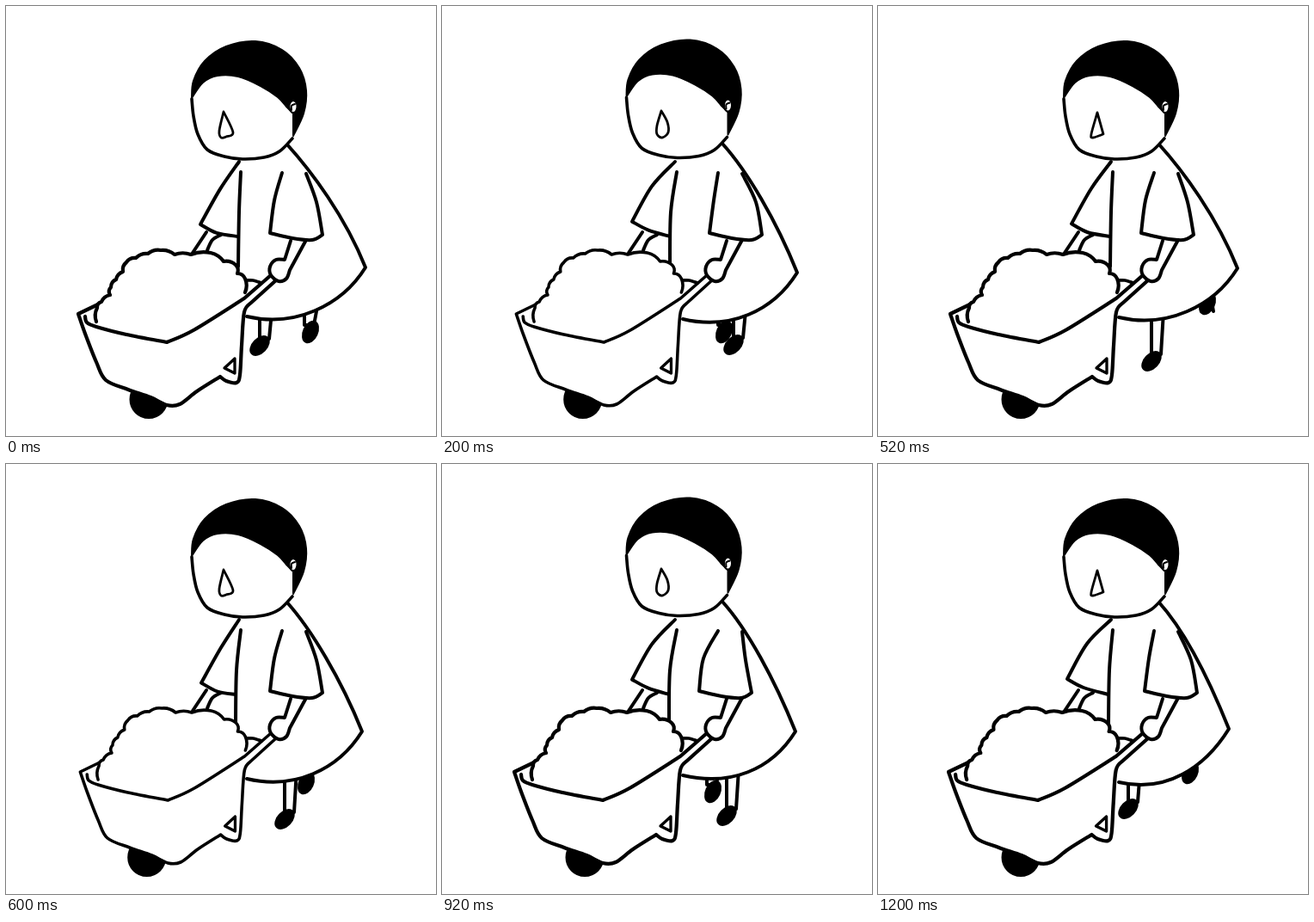
An HTML page with a canvas that plays this animation: 500x500 px, repeating every 1400 ms.

```html
<!DOCTYPE html>
<html lang="en">
<head>
<meta charset="utf-8">
<title>Pushing a wheelbarrow</title>
<style>
  html, body { margin: 0; height: 100%; overflow: hidden; background: #fff; }
  canvas { display: block; width: 100vw; height: 100vh; object-fit: contain; }
</style>
</head>
<body>
<canvas id="stage" width="500" height="500"></canvas>
<script>
const ctx = document.getElementById('stage').getContext('2d');
const STEP = 200;
const WHITE = '#fff', BLACK = '#000';

// hem: back corner of the dress and its depth; sleeve, front, cuff: x of each edge;
// near, far: centres of the shoes; look: nose shape; stretch: widening of the barrow.
const poses = [
  { hem: [418, 304, 374], sleeve: 226, front: 270, cuff: 307, near: [295, 395], far: [354, 379], look: 0, stretch: 0 },
  { hem: [413, 310, 377], sleeve: 221, front: 265, cuff: 311, near: [339, 394], far: [328, 379], look: 1, stretch: -2.3 },
  { hem: [418, 305, 375], sleeve: 225, front: 270, cuff: 306, near: [318, 413], far: [383, 346], look: 2, stretch: 0 },
  { hem: [414, 311, 379], sleeve: 227, front: 267, cuff: 307, near: [324, 413], far: [349, 371], look: 0, stretch: -2.3 },
  { hem: [411, 311, 375], sleeve: 221, front: 264, cuff: 299, near: [331, 409], far: [315, 381], look: 1, stretch: 0 },
  { hem: [407, 307, 371], sleeve: 231, front: 264, cuff: 314, near: [297, 395], far: [355, 371], look: 0, stretch: -2.3 },
  { hem: [408, 308, 383], sleeve: 220, front: 268, cuff: 310, near: [291, 401], far: [363, 359], look: 2, stretch: 2 }
];

const noses = [
  '253,123! 264,147 256,152 250,153 248,145 253,123!',
  '255,122! 262,135 263,147 256,153 250,149 250,139 255,122!',
  '255,124! 262,149! 250,153 248,149 255,124!'
];

// Smooth curve through "x,y" points; "!" marks a sharp corner.
function curve(text) {
  const pts = [];
  for (const word of text.split(' ')) {
    const p = word.replace('!', '').split(',').map(Number);
    pts.push(p);
    if (word.endsWith('!')) pts.push(p);
  }
  const path = new Path2D();
  path.moveTo(...pts[0]);
  for (let i = 0; i < pts.length - 1; i++) {
    const b = pts[i], c = pts[i + 1];
    if (b === c) continue;
    const a = pts[i - 1] || b, d = pts[i + 2] || c;
    path.bezierCurveTo(
      b[0] + (c[0] - a[0]) / 6, b[1] + (c[1] - a[1]) / 6,
      c[0] - (d[0] - b[0]) / 6, c[1] - (d[1] - b[1]) / 6, ...c);
  }
  return path;
}

// Chain of small outward bumps between the given points.
function bumps(text, height) {
  const pts = text.split(' ').map(word => word.split(',').map(Number));
  const path = new Path2D();
  path.moveTo(...pts[0]);
  for (let i = 1; i < pts.length; i++) {
    const [x0, y0] = pts[i - 1], [x1, y1] = pts[i];
    const k = height / Math.hypot(x1 - x0, y1 - y0);
    path.quadraticCurveTo(
      (x0 + x1) / 2 + (y1 - y0) * k, (y0 + y1) / 2 - (x1 - x0) * k, x1, y1);
  }
  return path;
}

function draw(shape, width, fill) {
  const path = typeof shape === 'string' ? curve(shape) : shape;
  if (fill) {
    ctx.fillStyle = fill;
    ctx.fill(path);
  }
  ctx.lineWidth = width;
  ctx.stroke(path);
}

function oval(x, y, rx, ry, tilt = 0) {
  const path = new Path2D();
  path.ellipse(x, y, rx, ry, tilt, 0, 2 * Math.PI);
  return path;
}

function foot([x, y], tilt, legX) {
  const ankle = y - 8;
  draw(`${legX},355! ${legX},${ankle}! ${legX + 11},${ankle}! ${legX + 14},355!`, 4, WHITE);
  draw(oval(x, y, 13, 8, tilt), 2, BLACK);
}

function drawDress({ hem: [x, y, depth], sleeve, front }) {
  draw(new Path2D(`M326 160 C355 192 ${x - 24} ${y - 60} ${x} ${y}
    C${x - 28} ${y + 45} 335 ${depth} 280 ${depth - 13}`), 4, WHITE);
  draw(`273,193 ${front + 1},240 ${front},303`, 4);
  const side = 250 + (sleeve - 220) * 0.65;
  draw(`271,181 ${sleeve + 23},${side - 41} ${sleeve},${side}! ${sleeve + 19},${side + 10} ${front},268`, 4);
  draw('233,263 217,287', 4);
  draw('250,266 240,272 234,284', 4);
}

function drawBarrow({ stretch }) {
  const pen = stretch < 0 ? 3.6 : 4.2;
  draw(oval(166 + Math.min(stretch, 0), 457.5, 21.5, 21.5), 2, BLACK);
  ctx.save();
  ctx.translate(312, 0);
  ctx.scale(1 + stretch / 228, 1);
  ctx.translate(-312, 0);
  draw('109,346! 84,358! 92,381 105,414 116,435 142,446 168,455 187,464 202,463 222,448 249,431! 256,436 268,438 272,429 274,395 277,356 285,345! 315,318', pen, WHITE);
  draw(bumps('105,367 106,351 111,344 121,336 122,327 128,318 136,309 140,298 151,293 165,288 180,284 196,289 215,289 238,287 253,297 267,301 269,311 278,317 278,333', 3.5), pen, WHITE);
  draw('92,361 94,368 105,373 140,382 187,391! 218,377 277,340! 308,313', pen);
  draw('266,410! 266,427! 254,421! 266,410!', 3.3);
  draw('280,319 287,319 297,322', 3.8);
  ctx.restore();
}

function drawArm({ cuff }) {
  draw('331,273 324,295! 314,295 307,303 308,313 317,320 326,317 330,307! 349,272', 4, WHITE);
  draw(`321,194 ${cuff + 5},226 ${cuff},264! ${cuff + 26},270 ${cuff + 49},272 ${cuff + 61},266! ${cuff + 54},228 349,195`, 4);
}

function drawHead({ look }) {
  const nod = look === 1 ? -1.5 : 0;
  ctx.save();
  ctx.translate(nod, nod);
  draw('216,108 218,128 223,149 234,167 254,175 275,178 300,176 318,169 333,154', 3.6, WHITE);
  draw('216,107 218,87 231,64 256,47 290,41 321,51 341,72 349,98 346,125 334,151! 334,125! 326,117! 316,106 296,93 270,82 246,81 229,89 216,107!', 2, BLACK);
  draw(oval(334, 117, 4.5, 7), 2, WHITE);
  draw('332,121 332,116 336,114', 2);
  ctx.restore();
  draw(noses[look], 2.8);
}

function render(pose) {
  ctx.fillStyle = WHITE;
  ctx.fillRect(0, 0, 500, 500);
  foot(pose.far, -1.15, pose.far[0] - 7);
  foot(pose.near, -0.8, pose.near[0]);
  drawDress(pose);
  drawBarrow(pose);
  drawArm(pose);
  drawHead(pose);
}

ctx.lineCap = ctx.lineJoin = 'round';
const start = performance.now();

function tick() {
  const step = Math.floor((performance.now() - start) / STEP);
  render(poses[step % poses.length]);
  requestAnimationFrame(tick);
}
tick();
</script>
</body>
</html>
```
